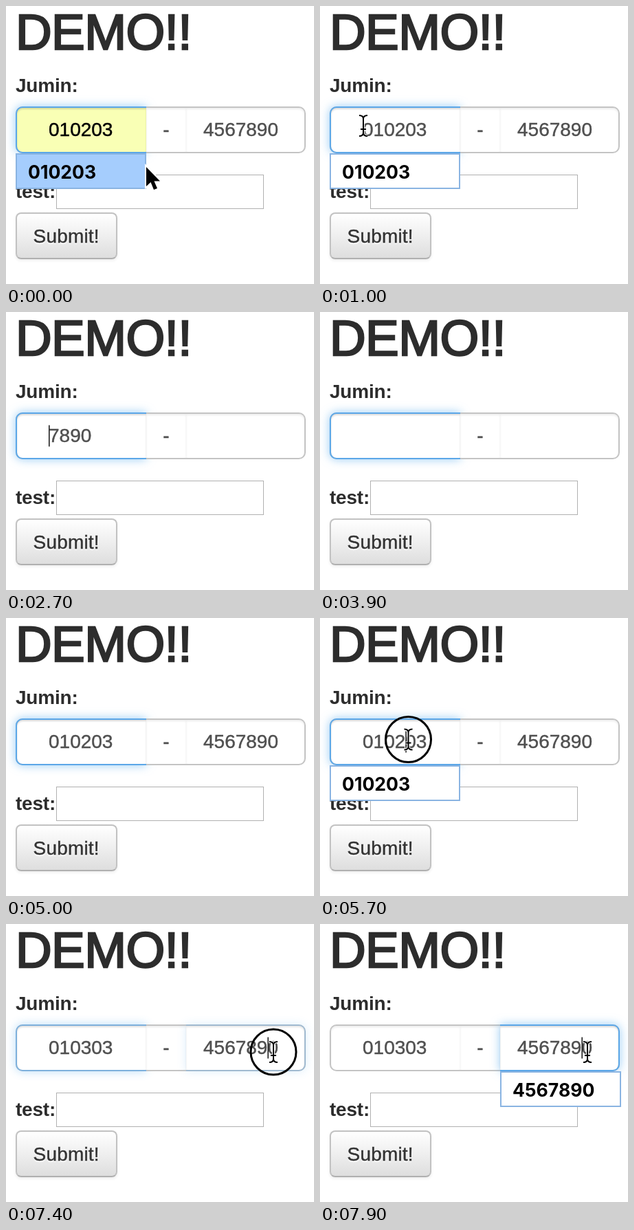
An HTML page that plays this animation: 448x404 px, repeating every 8000 ms.

```html
<!DOCTYPE html>
<html lang="en">
<head>
<meta charset="utf-8">
<title>Split number field demo</title>
<style>
html, body { margin: 0; width: 448px; height: 404px; overflow: hidden; background: #fff; }
body { position: relative; font: 28px "Liberation Sans", Arial, sans-serif; color: #2d2d2d; }
body * { position: absolute; box-sizing: border-box; white-space: pre; }
h1 { left: 14px; top: -1px; margin: 0; font-size: 73px; font-weight: 400; line-height: 78px;
  letter-spacing: -.6px; -webkit-text-stroke: 2.5px #2d2d2d; }
b { left: 14px; line-height: 40px; letter-spacing: -.2px; }
.field { top: 146px; height: 68px; border: 2px solid #c4c4c4; line-height: 64px; color: #505050;
  background: #fff; box-shadow: inset 0 2px 3px rgba(0,0,0,.08); }
.field span, #submit { -webkit-text-stroke: .45px; }
.glow { inset: -2px; border: 2px solid #5ba7e8; border-radius: inherit;
  box-shadow: inset 0 2px 2px rgba(0,0,0,.075), 0 0 14px rgba(82,168,236,.6); }
#first { left: 14px; width: 190px; border-right: 0; border-radius: 10px 0 0 10px; }
#first .glow { right: 0; border-right: 0; }
#dash { left: 204px; width: 58px; border-width: 2px 0; text-align: center; }
#dash span { left: 0; width: 58px; }
#second { left: 262px; width: 174px; border-left: 0; border-radius: 0 10px 10px 0; }
#second .glow { left: 0; border-left: 0; }
#first span { left: 46px; }
#second span { left: 25px; }
#test { left: 73px; top: 245px; width: 302px; height: 50px; border: 1px solid #b0b0b0; }
#submit { left: 14px; top: 300px; width: 148px; height: 68px; border: 2px solid #c2c2c2; border-bottom-color: #b0b0b0;
  border-radius: 8px; padding-left: 23.5px; line-height: 65px; letter-spacing: .2px; color: #333; text-shadow: 0 2px 2px #fff;
  background: linear-gradient(#fff, #dedede); box-shadow: 0 2px 4px rgba(0,0,0,.07); }
.menu { top: 214px; height: 52px; border: 2px solid #8ab4e2; background: #fff; color: #000;
  padding-left: 16px; font: 700 26.6px/51px Inter, sans-serif; }
#menu1 { left: 14px; width: 190px; }
#menu2 { left: 262px; width: 176px; }
.hover { background: #a5cdfd; }
svg { left: 0; top: 0; }
</style>
</head>
<body>
<h1>DEMO!!</h1>
<b style="top:96px">Jumin:</b>
<b style="top:250px">test:</b>
<div id="test"></div>
<div id="submit">Submit!</div>
<div id="first" class="field"><div class="glow"></div><span></span></div>
<div id="dash" class="field"><span>-</span></div>
<div id="second" class="field"><div class="glow"></div><span></span></div>
<div id="menu1" class="menu">010203</div>
<div id="menu2" class="menu">4567890</div>
<svg width="448" height="404">
  <defs><path id="beamShape" d="M-6-15Q0-15 0-10Q0-15 6-15M0-10V10M-6 15Q0 15 0 10Q0 15 6 15M-4 5H4"/></defs>
  <rect id="caret" y="164.5" width="1.6" height="31" fill="#222"/>
  <g id="pointer">
    <path id="arrow" d="M0 0V28L6.5 22L11 33L16 31L11.5 20.5H20Z" stroke="#fff" stroke-width="4" paint-order="stroke"/>
    <g id="beam" fill="none">
      <use href="#beamShape" stroke="#fff" stroke-width="4"/>
      <use href="#beamShape" stroke="#000" stroke-width="2"/>
    </g>
    <circle id="ring" r="33" fill="none" stroke="#000" stroke-width="3"/>
  </g>
</svg>
<script>
const LOOP = 8000, STEP = 100, DIGIT = 28 * 0.556;
const $ = id => document.getElementById(id);
const show = (id, on) => { $(id).style.visibility = on ? 'visible' : 'hidden'; };
const within = (t, ...spans) => spans.some(([from, to]) => t >= from && t < to);

// time, x, y of the mouse
const track = [
  [0, 204, 234], [300, 150, 174], [400, 150, 174], [500, 63, 174], [5100, 63, 174],
  [5600, 128.5, 176.5], [6700, 128.5, 176.5], [6800, 173, 173], [7400, 389, 186], [LOOP, 389, 186]
];

function mouseAt(t) {
  const i = track.findIndex(p => p[0] > t);
  const [t0, x0, y0] = track[i - 1], [t1, x1, y1] = track[i];
  const k = (t - t0) / (t1 - t0);
  return [x0 + (x1 - x0) * k, y0 + (y1 - y0) * k];
}

function digitsAt(t) {
  const full = '0102034567890';
  if (t >= 6500) return '0103034567890';
  if (t >= 6200) return '010034567890';
  if (t < 1200 || t >= 4400) return full;
  // key repeat of the delete key
  return full.slice(Math.floor((t - 1150) / 191.67) + 1);
}

function caretX(t) {
  if (t >= 7400) return 287 + 6 * DIGIT;
  const index = t < 4400 ? 0 : t < 5700 ? 6 : t >= 6200 && t < 6500 ? 3 : 4;
  return 62 + index * DIGIT;
}

function draw(t) {
  const [x, y] = mouseAt(t), digits = digitsAt(t);
  const hover = y > 214;
  const focus = Math.min(1, Math.max(0, (t - 7300) / 300));
  const first = $('first'), second = $('second');

  first.lastChild.textContent = digits.slice(0, 6);
  second.lastChild.textContent = digits.slice(6);
  first.style.background = hover ? '#f9ffb5' : '#fff';
  first.style.color = hover ? '#000' : '';
  first.firstChild.style.opacity = 1 - focus;
  second.firstChild.style.opacity = focus;

  $('menu1').classList.toggle('hover', hover);
  show('menu1', within(t, [0, 1200], [5700, 6200]));
  show('menu2', t >= 7500);

  $('caret').setAttribute('x', caretX(t));
  show('caret', within(t, [500, 1000], [1200, 3900], [4300, 4900], [5700, 7000], [7400, LOOP]));

  const visible = !within(t, [1200, 5200], [6200, 6800]);
  $('pointer').setAttribute('transform', `translate(${x} ${y})`);
  show('arrow', visible && hover);
  show('beam', visible && !hover);
  show('ring', within(t, [500, 600], [5700, 5800], [7400, 7500]));
}

function tick() {
  draw(Math.floor(performance.now() % LOOP / STEP) * STEP);
  requestAnimationFrame(tick);
}
tick();
</script>
</body>
</html>
```
